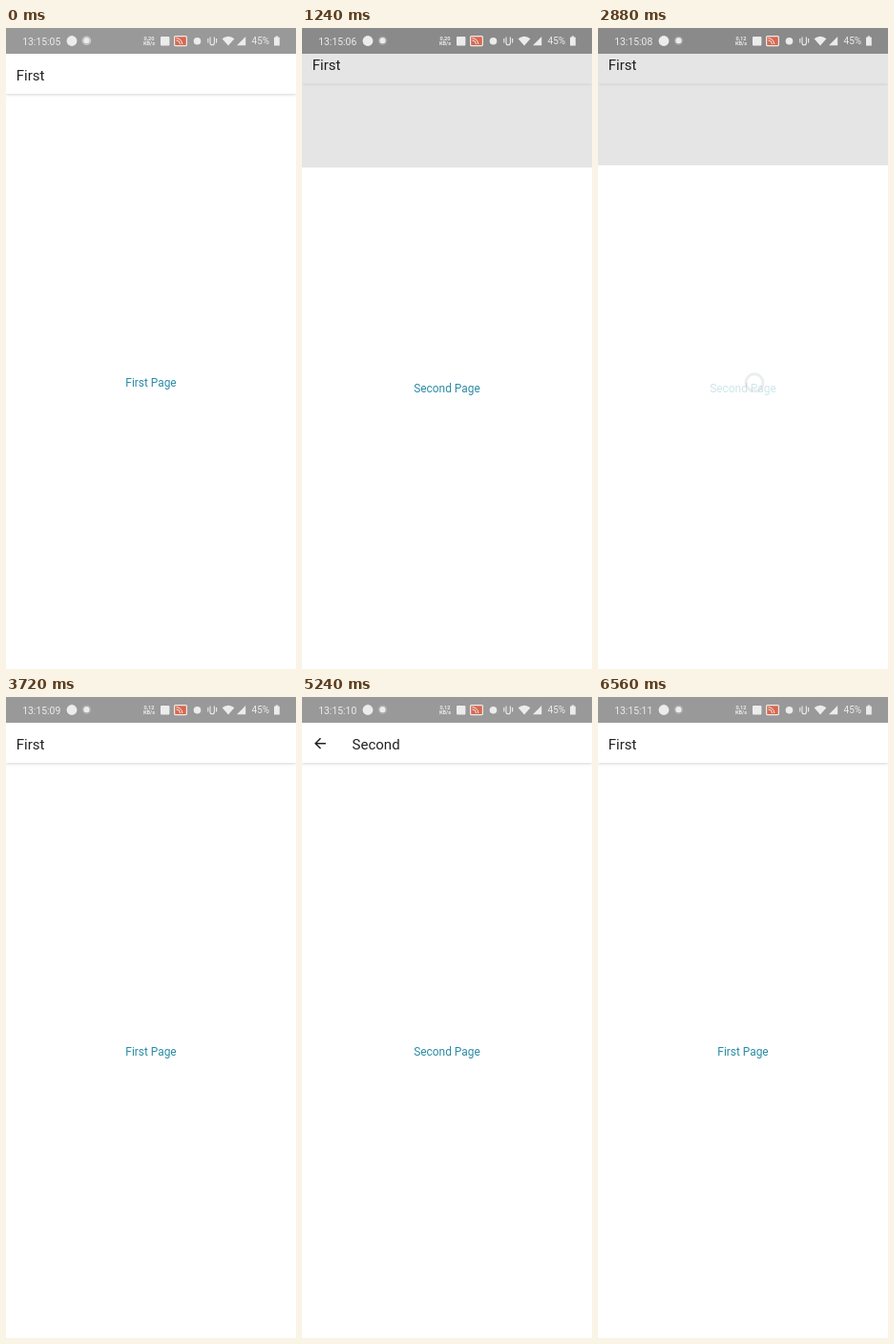
These frames come from a looping animation (304x672 px, 6.6 s). An HTML page:

```html
<!DOCTYPE html>
<html lang="en">
<head>
<meta charset="utf-8">
<title>Reveal navigation</title>
<style>
  html, body { margin: 0; width: 100%; height: 100%; overflow: hidden; background: #fff; }
  #stage { position: relative; width: 304px; height: 672px; overflow: hidden; background: #fff; font-family: Roboto, sans-serif; }
  .layer { position: absolute; left: 0; top: 0; width: 304px; height: 672px; background: #fff; overflow: hidden; }
  #first { overflow: visible; }
  .header { position: absolute; left: 0; top: 0; width: 304px; height: 69px; background: #fff; box-shadow: 0 1px 3px rgba(0, 0, 0, .17); }
  svg { position: absolute; left: 0; top: 0; width: 304px; height: 672px; overflow: visible; }
  .title { font-size: 15px; fill: #222; }
  .link { font-size: 11.9px; fill: #2a8ba6; text-anchor: middle; }
  #shade { position: absolute; left: 0; top: 0; width: 304px; height: 672px; background: #000; opacity: 0; }
  #bar { position: absolute; left: 0; top: 0; width: 304px; height: 27px; background: rgba(0, 0, 0, .4); }
  #bar svg { height: 27px; }
</style>
</head>
<body>
<div id="stage">
  <div class="layer" id="first">
    <div class="header"></div>
    <svg viewBox="0 0 304 672">
      <text class="title" x="10.8" y="54.5">First</text>
      <text class="link" id="link1" x="152" y="376.2">First Page</text>
    </svg>
  </div>
  <div id="shade"></div>
  <div class="layer" id="reveal">
    <div class="layer" id="second">
      <div class="header"></div>
      <svg viewBox="0 0 304 672">
        <path transform="translate(10.1 39.8) scale(.74)" fill="#222" d="M20 11H7.83l5.59-5.59L12 4l-8 8 8 8 1.41-1.41L7.83 13H20z"/>
        <text class="title" x="52.6" y="54.5">Second</text>
        <text class="link" id="link2" x="152" y="376.2">Second Page</text>
      </svg>
    </div>
  </div>
  <svg viewBox="0 0 304 672">
    <circle id="touch" cx="164" cy="371.8" r="9" fill="none" stroke="#c3cdd2" stroke-width="3" opacity="0"/>
  </svg>
  <div id="bar">
    <svg viewBox="0 0 304 27" fill="#ececec">
      <text id="clock" x="17.2" y="17.5" font-size="10.4"></text>
      <circle cx="69" cy="13.5" r="5.4"/>
      <circle cx="84.5" cy="13.3" r="3.2"/>
      <circle id="glow" cx="84.5" cy="13.3" r="4.2" fill="none" stroke="#ececec" stroke-width="1.2"/>
      <g font-size="5.6" font-weight="700" text-anchor="middle">
        <text id="speed" x="150" y="12.6"></text>
        <text x="150" y="18.4">KB/s</text>
      </g>
      <rect x="162" y="9" width="9.4" height="9.4" rx="1"/>
      <rect x="176.6" y="8.6" width="12.8" height="10" rx="1" fill="#d9684f" stroke="#ececec" stroke-width="1.2"/>
      <path d="M178.5 13a4 4 0 0 1 4 4M178.5 10.7a6.3 6.3 0 0 1 6.3 6.3" fill="none" stroke="#ececec"/>
      <circle cx="200.5" cy="13.7" r="3.8"/>
      <path d="M214 9.5v6.2q0 2 2.2 2t2.2-2V9.5M211.8 11v4.6M220.6 11v4.6" fill="none" stroke="#ececec" stroke-width="1.1"/>
      <path d="M226.6 11.3q6.4-5 12.8 0L233 18.6zM251.2 9v9.2h-9.2z"/>
      <text x="257.6" y="17.4" font-size="10">45%</text>
      <path d="M282.6 9.8V8.6h2.6v1.2h1.6v8.6h-5.8V9.8z"/>
    </svg>
  </div>
</div>
<script>
const $ = id => document.getElementById(id);
const LOOP = 6600, STEP = 40, HEIGHT = 672, SLIDE = 425;

// Each tap: finger down, navigation start, and whether it opens the second page.
const taps = [
  { down: 950, go: 1104, open: true },
  { down: 2700, go: 2829, open: false },
  { down: 4310, go: 4520, open: true },
  { down: 5910, go: 6060, open: false }
];
const ticks = [720, 1680, 2720, 3720, 4720, 5680];

const clamp = v => Math.min(1, Math.max(0, v));
const mix = (a, b, k) => a + (b - a) * k;
const quad = k => k < .5 ? 2 * k * k : 1 - 2 * (1 - k) ** 2;

// cubic-bezier(.35, .45, 0, 1)
function ease(x) {
  if (x <= 0 || x >= 1) return clamp(x);
  const curve = (s, a, b) => 3 * (1 - s) ** 2 * s * a + 3 * (1 - s) * s * s * b + s ** 3;
  let lo = 0, hi = 1;
  for (let i = 0; i < 24; i++) {
    const mid = (lo + hi) / 2;
    if (curve(mid, .35, 0) < x) lo = mid; else hi = mid;
  }
  return curve(lo, .45, 1);
}

function progress(t) {
  const tap = taps.filter(a => t >= a.go).pop();
  if (!tap) return 0;
  const k = ease((t - tap.go) / SLIDE);
  return tap.open ? k : 1 - k;
}

function linkOpacity(t, open) {
  const tap = taps.filter(a => a.open === open && t >= a.down).pop();
  if (!tap) return 1;
  const pressed = mix(1, .15, quad(clamp((Math.min(t, tap.go) - tap.down) / 130)));
  return mix(pressed, 1, quad(clamp((t - tap.go) / 250)));
}

function paint(t) {
  const p = progress(t), edge = HEIGHT * (1 - p);
  $('first').style.transform = `translateY(${-.02 * HEIGHT * p}px)`;
  $('reveal').style.transform = `translateY(${edge}px)`;
  $('second').style.transform = `translateY(${-.959 * edge}px)`;
  $('shade').style.opacity = .1 * clamp(p / .36);
  $('link1').style.opacity = linkOpacity(t, true);
  $('link2').style.opacity = linkOpacity(t, false);
  const touched = taps.some(a => t >= a.down && t < a.go + 70);
  $('touch').setAttribute('opacity', touched ? .35 : 0);
  $('glow').setAttribute('opacity', mix(.6, .25, clamp((t - 120) / 280)));
  const seconds = 5 + ticks.filter(a => t >= a).length;
  $('clock').textContent = '13:15:' + String(seconds).padStart(2, '0');
  $('speed').textContent = t < 2160 ? '0,20' : '0,12';
}

const start = performance.now();
function frame() {
  const t = (performance.now() - start) % LOOP;
  paint(Math.floor(t / STEP) * STEP);
  requestAnimationFrame(frame);
}
frame();
</script>
</body>
</html>
```
